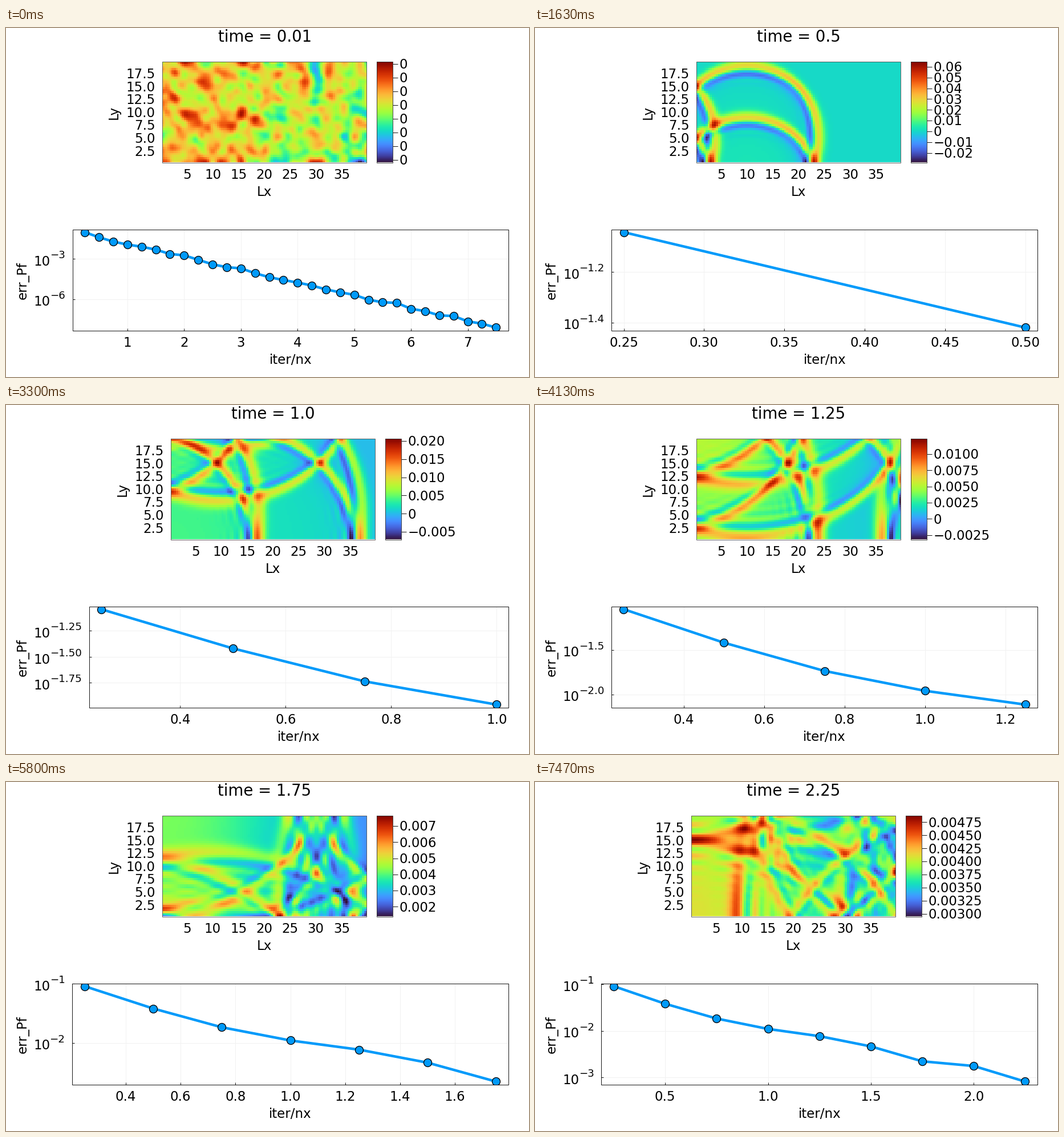
Write a matplotlib script that moves like this. It is 917x611 px and loops after 8 s.

```python
import matplotlib.pyplot as plt
import numpy as np
from matplotlib.animation import ArtistAnimation
from matplotlib.patches import Rectangle

W, H, DPI = 917, 611, 100
STEP_MS, LOOP_MS = 40, 8000
SWITCH_MS = [800, 1630, 2470, 3300, 4130, 4970, 5800, 6630, 7470]
PT = 72 / DPI                       # points per pixel
FONT, BIG, SUP = 22.9, 27.5, 18.3   # text sizes in pixels
BLUE = "#009AFA"

# Layout in pixels
HEAT_TOP, HEAT_BOTTOM, HEAT_W = 58.5, 235.5, 358
PLOT_TOP, PLOT_BOTTOM, PLOT_RIGHT = 352.5, 529.5, 881
BAR_X, BAR_W = 376, 27.7

# Physical domain and grid
LX, LY, NX, NY = 40.0, 20.0, 100, 50

# log10 of the residual, one value every quarter of iter/nx
LOG_ERR = np.array([
    -1.043, -1.42, -1.737, -1.96, -2.115, -2.335, -2.655, -2.755, -3.09, -3.42,
    -3.635, -3.72, -4.08, -4.375, -4.585, -4.775, -4.99, -5.285, -5.495, -5.685,
    -6.045, -6.235, -6.28, -6.72, -6.89, -7.21, -7.25, -7.65, -7.82, -8.11])

# title time, iterations, left edge of lower plot,
# x ticks and y ticks as (first, step, count)
STATES = [
    (0.01, 750, 116.6, (1, 1, 7), (-3, -3, 2)),
    (0.25, 25, 134.2, (0.4, 0.2, 5), (0, -0.3, 4)),
    (0.5, 50, 134.4, (0.25, 0.05, 6), (-1.2, -0.2, 2)),
    (0.75, 75, 133.8, (0.3, 0.1, 5), (-1.2, -0.3, 2)),
    (1.0, 100, 145.9, (0.4, 0.2, 4), (-1.25, -0.25, 3)),
    (1.25, 125, 134.2, (0.4, 0.2, 5), (-1.5, -0.5, 2)),
    (1.5, 150, 134.2, (0.4, 0.2, 6), (-1.5, -0.5, 2)),
    (1.75, 175, 116.1, (0.4, 0.2, 7), (-1, -1, 2)),
    (2.0, 200, 116.1, (0.5, 0.5, 4), (-1, -1, 2)),
    (2.25, 225, 116.4, (0.5, 0.5, 4), (-1, -1, 3)),
]


def simulate(wanted):
    """Accelerated pseudo-transient pressure solver; fields at chosen iterations."""
    dx, dy = LX / NX, LY / NY
    cfl, re = 1 / np.sqrt(2.1), 2 * np.pi
    theta = max(LX, LY) / re / cfl / min(dx, dy)
    beta = re / (cfl * min(dx, dy) * max(LX, LY))
    xc = (np.arange(NX) + 0.5) * dx
    yc = (np.arange(NY) + 0.5) * dy
    p = np.exp(-(xc[:, None] - LX / 4) ** 2 - (yc[None, :] - LY / 4) ** 2)
    qx, qy = np.zeros((NX + 1, NY)), np.zeros((NX, NY + 1))
    fields = {}
    for it in range(1, max(wanted) + 1):
        qx[1:-1] -= (qx[1:-1] + np.diff(p, axis=0) / dx) / (1 + theta)
        qy[:, 1:-1] -= (qy[:, 1:-1] + np.diff(p, axis=1) / dy) / (1 + theta)
        p -= (np.diff(qx, axis=0) / dx + np.diff(qy, axis=1) / dy) / beta
        if it in wanted:
            fields[it] = p.T.copy()
    return fields


def decimals(step):
    d = 0
    while abs(step * 10**d - round(step * 10**d)) > 1e-6:
        d += 1
    return d


def number(v, places):
    return f"{v:.{places}f}".replace("-", "\u2212")


def bar_ticks(lo, hi):
    """Finest 1 / 2.5 / 5 step that gives at most nine ticks."""
    for e in range(-10, 2):
        for m in (1, 2.5, 5):
            step = m * 10.0**e
            first, last = int(np.ceil(lo / step)), int(np.floor(hi / step))
            if last - first < 9:
                return step, [i * step for i in range(first, last + 1)]


fig = plt.figure(figsize=(W / DPI, H / DPI), dpi=DPI, facecolor="white")
plt.rcParams["font.family"] = "DejaVu Sans"
ax = fig.add_axes([0, 0, 1, 1])
ax.set_xlim(0, W)
ax.set_ylim(H, 0)
ax.axis("off")


def text(x, y, s, size=FONT, ha="center"):
    return ax.text(x, y, s, fontsize=size * PT, ha=ha, va="baseline")


def upright(x, y, s):
    return ax.text(x, y, s, fontsize=FONT * PT, rotation=90,
                   rotation_mode="anchor", ha="center", va="baseline")


def line(x0, y0, x1, y1, color="black", width=0.9, z=2):
    return ax.plot([x0, x1], [y0, y1], color=color, lw=width * PT, zorder=z,
                   solid_capstyle="butt")[0]


def box(x0, y0, x1, y1, color="black"):
    return ax.add_patch(Rectangle((x0, y0), x1 - x0, y1 - y0, fill=False,
                                  ec=color, lw=0.9 * PT, zorder=5))


def picture(data, extent, frame):
    im = ax.imshow(data, cmap="turbo", origin="lower", extent=extent,
                   aspect="auto", interpolation="nearest", zorder=1)
    im.set_clip_path(frame)
    return im


def draw_heat(field, time, left):
    s = HEAT_W / (LX - 0.4)
    right = left + HEAT_W
    mid = left + HEAT_W / 2
    px = lambda v: left + (v - 0.2) * s
    py = lambda v: HEAT_BOTTOM - (v - 0.2) * s
    frame = box(left, HEAT_TOP, right, HEAT_BOTTOM, "#555555")
    out = [frame, picture(field, (px(0), px(LX), py(0), py(LY)), frame),
           text(mid + 0.5, 24.2, f"time = {time}", BIG),
           text(mid, 294.4, "Lx"),
           upright(left - 78, 147.5, "Ly")]
    out += [text(px(v), 264.3, str(v)) for v in range(5, 40, 5)]
    out += [text(left - 12.3, py(v) + 8.9, f"{v:.1f}", ha="right")
            for v in np.arange(2.5, 20, 2.5)]

    # colour bar
    lo, hi = field.min(), field.max()
    x0, x1 = left + BAR_X, left + BAR_X + BAR_W
    frame = box(x0, HEAT_TOP, x1, HEAT_BOTTOM, "#333333")
    ramp = np.linspace(0, 1, 256)[:, None]
    out += [frame, picture(ramp, (x0, x1, HEAT_BOTTOM, HEAT_TOP), frame)]
    step, ticks = bar_ticks(lo, hi)
    for v in ticks:
        y = HEAT_BOTTOM - (v - lo) / (hi - lo) * (HEAT_BOTTOM - HEAT_TOP)
        label = "0" if abs(v) < step / 10 else number(v, decimals(step))
        out += [line(x1, y, x1 + 9, y),
                text(left + 415.5, y + 8.3, label, ha="left")]
    return out


def power_label(right, y, label):
    """Ten with a raised exponent, set against the right edge."""
    em = sum({".": 0.318, "\u2212": 0.838}.get(c, 0.636) for c in label)
    return [text(right, y - 1, label, SUP, "right"),
            text(right - (em - 0.08) * SUP - 0.5, y + 11.8, "10", ha="right")]


def draw_error(count, left, xspec, yspec):
    xs = 0.25 * np.arange(1, count + 1)
    ys = LOG_ERR[:count]
    x0, x1 = xs[0], xs[-1] if count > 1 else xs[0] + 1
    y0, y1 = ys[-1], ys[0] if count > 1 else np.log10(10 ** ys[0] + 1)
    xpad, ypad = 0.03 * (x1 - x0), 0.03 * (y1 - y0)
    sx = (PLOT_RIGHT - left) / (x1 - x0 + 2 * xpad)
    sy = (PLOT_BOTTOM - PLOT_TOP) / (y1 - y0 + 2 * ypad)
    px = lambda v: left + (v - x0 + xpad) * sx
    py = lambda v: PLOT_BOTTOM - (v - y0 + ypad) * sy

    frame = box(left, PLOT_TOP, PLOT_RIGHT, PLOT_BOTTOM)
    out = [frame, text((left + PLOT_RIGHT) / 2, 588, "iter/nx"),
           upright(36, 442, "err_Pf")]
    grid = "#f1f1f1"
    first, step, n = xspec
    for v in first + step * np.arange(n):
        x = px(v)
        places = max(decimals(step), decimals(first))
        out += [line(x, PLOT_TOP, x, PLOT_BOTTOM, grid, 1, 1),
                line(x, PLOT_BOTTOM - 4, x, PLOT_BOTTOM),
                text(x, 558, number(v, places))]
    first, step, n = yspec
    for v in first + step * np.arange(n):
        y = py(v)
        out += [line(left, y, PLOT_RIGHT, y, grid, 1, 1),
                line(left, y, left + 4, y)]
        out += power_label(left - 12.8, y, number(v, decimals(abs(step))))
    curve, = ax.plot(px(xs), py(ys), "-o", color=BLUE, lw=4.5 * PT, ms=14 * PT,
                     mec="black", mew=1.3 * PT, zorder=4)
    curve.set_clip_path(frame)
    return out + [curve]


def draw_state(time, iters, left, xspec, yspec):
    heat_left = 274.1 + (left - 116.5) / 2
    return (draw_heat(fields[iters], time, heat_left)
            + draw_error(iters // 25, left, xspec, yspec))


fields = simulate({s[1] for s in STATES})
scenes = [draw_state(*s) for s in STATES]
times = np.arange(0, LOOP_MS, STEP_MS) + STEP_MS - 10
order = np.searchsorted(SWITCH_MS, times, side="right")
anim = ArtistAnimation(fig, [scenes[k] for k in order], interval=STEP_MS,
                       repeat=True, repeat_delay=0, blit=False)
plt.show()
```
